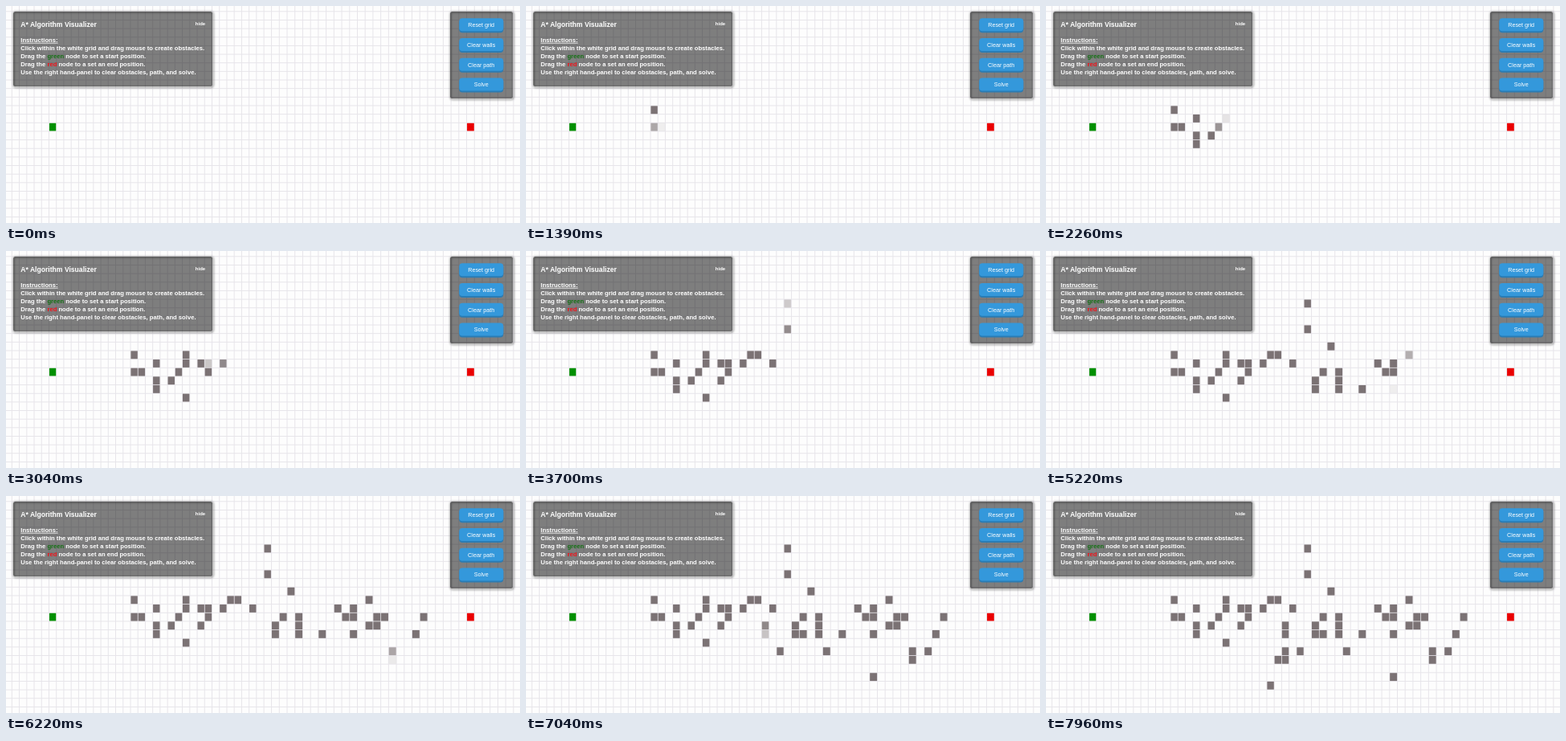
An HTML page that plays this animation: 640 px wide and 270 px high, repeating every 8000 ms.

```html
<!DOCTYPE html>
<html lang="en">
<head>
<meta charset="utf-8">
<title>A* Algorithm Visualizer</title>
<style>
  html, body { margin: 0; width: 100%; height: 100%; overflow: hidden; background: #fdfdfd; }
  svg { display: block; width: 640px; height: 270px; }
  text { font: 700 7.65px "Liberation Sans", Arial, sans-serif; fill: #fff; white-space: pre; }
  .title { font-size: 8.6px; }
  .hide { font-size: 6px; }
  .btn { font-weight: 400; font-size: 7.2px; text-anchor: middle; }
  .panel { fill: #000; fill-opacity: .5; }
  .shadow { fill: none; stroke: #555; stroke-opacity: .45; stroke-width: 2.5; filter: url(#soft); }
</style>
</head>
<body>
<svg id="stage" viewBox="0 0 640 270">
  <defs>
    <filter id="soft" x="-10%" y="-10%" width="120%" height="120%">
      <feGaussianBlur stdDeviation="1.2"/>
    </filter>
  </defs>
  <path id="grid" fill="none" stroke="#e7e5ea"/>
  <g id="cells"></g>

  <rect class="shadow" x="9.5" y="7.5" width="248.5" height="93.5" rx="3"/>
  <rect class="panel" x="9" y="7" width="248" height="93" rx="2.5"/>
  <text class="title" x="18.3" y="26.4">A* Algorithm Visualizer</text>
  <text class="hide" x="235.8" y="23.6">hide</text>
  <text x="18.3" y="44.8" text-decoration="underline">Instructions:</text>
  <text x="18.3" y="54.7">Click within the white grid and drag mouse to create obstacles.</text>
  <text x="18.3" y="64.9">Drag the <tspan fill="#137013">green</tspan> node to set a start position.</text>
  <text x="18.3" y="75.1">Drag the <tspan fill="#f0141c">red</tspan> node to a set an end position.</text>
  <text x="18.3" y="85.2">Use the right hand-panel to clear obstacles, path, and solve.</text>

  <rect class="shadow" x="553.5" y="7.5" width="78.5" height="108.5" rx="3"/>
  <rect class="panel" x="553" y="7" width="78" height="108" rx="2.5"/>
  <g id="buttons"></g>
</svg>
<script>
const LOOP = 8000, FADE = 250;
const ROW = 10.65, COL_L = 9.228, COL_R = 9.72, SPLIT = 29;

// Columns right of SPLIT are slightly wider.
const colWidth = c => c > SPLIT ? COL_R : COL_L;
const colX = c => 58.1 + COL_L * Math.min(c, SPLIT) + COL_R * Math.max(0, c - SPLIT);
const rowY = r => 65.4 + ROW * r;

// Obstacles as column,row in the order they are drawn.
const walls = ("11,6 11,8 12,8 14,7 14,9 14,10 16,9 17,8 18,7 18,6 18,11 20,7 21,8 23,7 21,7 " +
  "20,9 24,6 25,6 27,7 29,3 29,0 32,5 31,8 30,9 30,10 33,8 33,9 " +
  "33,10 36,10 38,7 39,8 40,7 40,8 42,6 40,10 42,9 43,8 43,9 44,8 49,8 48,10 45,12 45,13 " +
  "47,12 40,15 34,12 31,10 28,12 26,9 26,10 26,12 26,13 25,13 24,16")
  .split(" ").map(s => s.split(",").map(Number));

// Pace of drawing: [wall index, start time].
const pace = [[0, 1110], [2, 1365], [10, 2500], [14, 2945], [26, 4275], [34, 5195], [42, 6188], [53, 7365]];

function startTime(i) {
  const k = Math.max(1, pace.findIndex(p => p[0] >= i));
  const [i0, t0] = pace[k - 1], [i1, t1] = pace[k];
  return t0 + (t1 - t0) * (i - i0) / (i1 - i0);
}

function add(parent, tag, attrs, text) {
  const el = document.createElementNS("http://www.w3.org/2000/svg", tag);
  for (const key in attrs) el.setAttribute(key, attrs[key]);
  if (text) el.textContent = text;
  return document.getElementById(parent).appendChild(el);
}

function addCell(c, r, fill, gap) {
  const w = colWidth(c) - gap, h = ROW - gap;
  return add("cells", "rect", { x: colX(c) - w / 2, y: rowY(r) - h / 2, width: w, height: h, fill });
}

let lines = "";
for (let c = -6; c < 63; c++) lines += `M${colX(c) - colWidth(c) / 2} 0V270`;
for (let r = -6; r < 20; r++) lines += `M0 ${rowY(r) - ROW / 2}H640`;
document.getElementById("grid").setAttribute("d", lines);

addCell(0, 8, "#009000", 1);
addCell(55, 8, "#ea0000", 1);
const cells = walls.map(([c, r], i) => ({ el: addCell(c, r, "#7b7274", .8), start: startTime(i) }));

["Reset grid", "Clear walls", "Clear path", "Solve"].forEach((label, i) => {
  const y = 15.3 + 24.7 * i;
  add("buttons", "rect", { x: 564.3, y: y + 1.5, width: 55, height: 16.5, rx: 4, fill: "#2a7cb4" });
  add("buttons", "rect", { x: 564.3, y, width: 55, height: 16, rx: 4, fill: "#3498db" });
  add("buttons", "text", { class: "btn", x: 591.7, y: y + 10.8 }, label);
});

function render(t) {
  for (const { el, start } of cells)
    el.setAttribute("opacity", Math.min(1, Math.max(0, (t - start) / FADE)));
}

const origin = performance.now();
function tick() {
  render((performance.now() - origin) % LOOP);
  requestAnimationFrame(tick);
}
tick();
</script>
</body>
</html>
```
